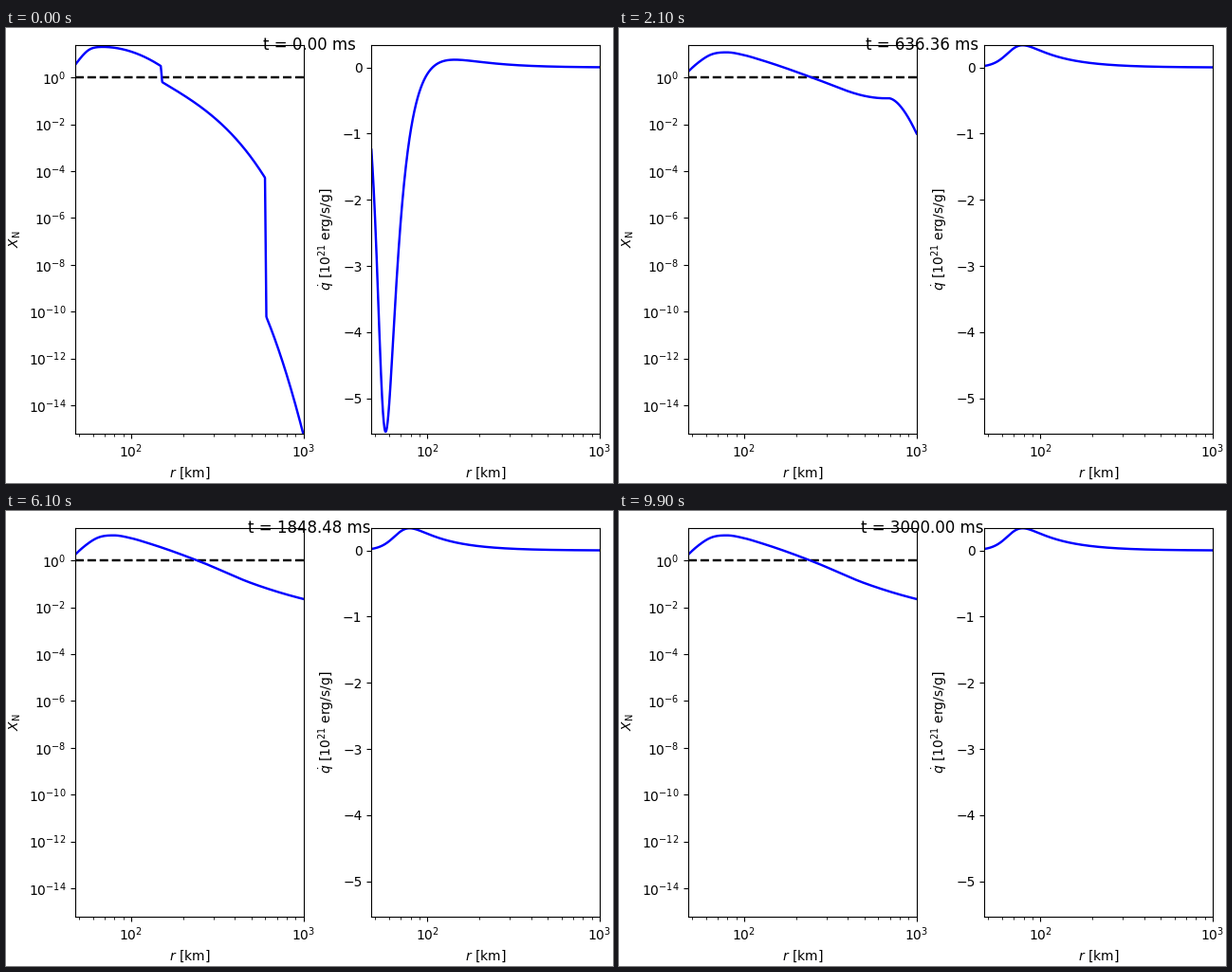
A matplotlib script for the animation above (10 s loop, 640 by 480 pixels).

```python
import numpy as np
import matplotlib.pyplot as plt
from matplotlib.animation import FuncAnimation

W, H, DPI = 640, 480, 100
FRAMES, T_END = 100, 3000.0
PANEL_W, TOP, BOTTOM = 240.77, 18.15, 428.15    # pixels
U_LIM = (1.676, 3.0)                            # u = log10 r
N_LIM = (-15.22, 1.376)                         # log10 X_N
Q_LIM = (-5.537, 0.337)
I_SHOCK, I_WIND = 6, 21      # steps at which shock and wind phases end

u = np.linspace(*U_LIM, 1000)
radius = 10 ** u


def mix(a, b, w):
    return a + (b - a) * w


def step(at, width=.008):
    return np.clip((u - at) / width + .5, 0, 1)


def relax(i, span, tau=4):
    """Exponential approach, 0 at the start and 1 after span."""
    i = np.clip(i, 0, span)
    return (1 - np.exp(-i / tau)) / (1 - np.exp(-span / tau))


def hermite(x, y):
    """Smooth curve through a few key points."""
    x, y = np.array(x), np.array(y)
    m, h = np.gradient(y, x, edge_order=2), np.diff(x)
    k = np.clip(np.searchsorted(x, u) - 1, 0, len(h) - 1)
    s = (u - x[k]) / h[k]
    return (y[k] * (1 + 2 * s) * (1 - s) ** 2 + y[k + 1] * s * s * (3 - 2 * s)
            + h[k] * s * (1 - s) * (m[k] * (1 - s) - m[k + 1] * s))


# Heated matter: a parabola in log r that bends down at its inner edge
# (top, peak, curvature, edge, edge slope, edge width)
DOME_START = np.array([1.305, 1.83, 7, 1.753, 7.7, .018])
DOME_SHOCK = np.array([1.40, 1.9, 4.15, 1.812, 6.6, .022])


def dome(params):
    top, peak, curve, edge, slope, width = params
    bend = slope * width * np.log1p(np.exp((edge - u) / width))
    return top - curve * (u - peak) ** 2 - bend


def undisturbed():
    """Matter ahead of the shock, with a sharp drop near 600 km."""
    d, e = u - 2.18, u - 2.784
    inner = -.2 - 4.4 * d - 6.9 * d ** 3
    outer = -10.23 - 18 * e - 25 * e ** 2
    return mix(inner, outer, step(2.78))


def bump(shift):
    d = u - shift
    return (.41 * np.exp((d - 2.83) / .16)
            - 49.5 * np.maximum(d - 2.835, 0) ** 1.8)


n_ahead = undisturbed()
n_steady = hermite([1.676, 1.735, 1.8, 1.9, 2.0, 2.1, 2.4, 2.7, 3.0],
                   [.25, .64, .95, 1.07, .95, .735, -.05, -.975, -1.65])
settle = np.interp(u, U_LIM, (.05, 1))    # outer layers settle later


def nucleons(i):
    hot = dome(mix(DOME_START, DOME_SHOCK, min(i / I_SHOCK, 1)))
    late = max(i - I_WIND, 0)
    wind = n_steady + bump(.012 * late) * np.exp(-late / 11)
    w = np.clip((i - I_SHOCK) / (I_WIND - I_SHOCK), 0, 1)
    behind = mix(hot, wind, w ** settle) if w else hot
    front = np.log10(150 + 582 * (i / I_SHOCK) ** 1.2)
    return mix(behind, n_ahead, step(front))


# Heating A / r^2 less cooling C / r^p, cut off inside
# (A, C, p, cutoff steepness, cutoff position)
Q_START = np.array([.40, .50, 5.2, 45, 1.739])
Q_SHOCK = np.array([.25, .30, 4.5, 53, 1.777])
Q_STEADY = np.array([.26, 0, 4.5, 24, 1.838])


def heating(i):
    params = mix(Q_START, Q_SHOCK, relax(i, I_SHOCK))
    params = mix(params, Q_STEADY, relax(i - I_SHOCK, I_WIND - I_SHOCK))
    heat, cool, p, k, edge = params
    x = radius / 100
    return (heat / x ** 2 - cool / x ** p) / (1 + np.exp(-k * (u - edge)))


def panel(left, ylabel):
    ax = fig.add_axes([left / W, 1 - BOTTOM / H,
                       PANEL_W / W, (BOTTOM - TOP) / H])
    ax.set_xscale("log")
    ax.set_xlim(10 ** U_LIM[0], 10 ** U_LIM[1])
    ax.set_xlabel("$r$ [km]")
    ax.set_ylabel(ylabel)
    return ax


fig = plt.figure(figsize=(W / DPI, H / DPI), dpi=DPI)
title = fig.suptitle("", y=.982)

ax_n = panel(73.03, r"$X_\mathrm{N}$")
ax_n.set_yscale("log")
ax_n.set_ylim(10 ** N_LIM[0], 10 ** N_LIM[1])
ax_n.set_yticks(10.0 ** np.arange(-14, 1, 2))
ax_n.yaxis.minorticks_off()
ax_n.axhline(1, color="k", ls="--", lw=1.75)
line_n, = ax_n.plot([], [], color="b", lw=1.75)

ax_q = panel(385.23, r"$\dot{q}$ [$10^{21}$ erg/s/g]")
ax_q.set_ylim(*Q_LIM)
line_q, = ax_q.plot([], [], color="b", lw=1.75)


def update(i):
    line_n.set_data(radius, 10 ** nucleons(i))
    line_q.set_data(radius, heating(i))
    title.set_text(f"t = {T_END * i / (FRAMES - 1):.2f} ms")
    return line_n, line_q, title


anim = FuncAnimation(fig, update, frames=FRAMES, interval=100,
                     repeat=True, repeat_delay=0)
plt.show()
```
